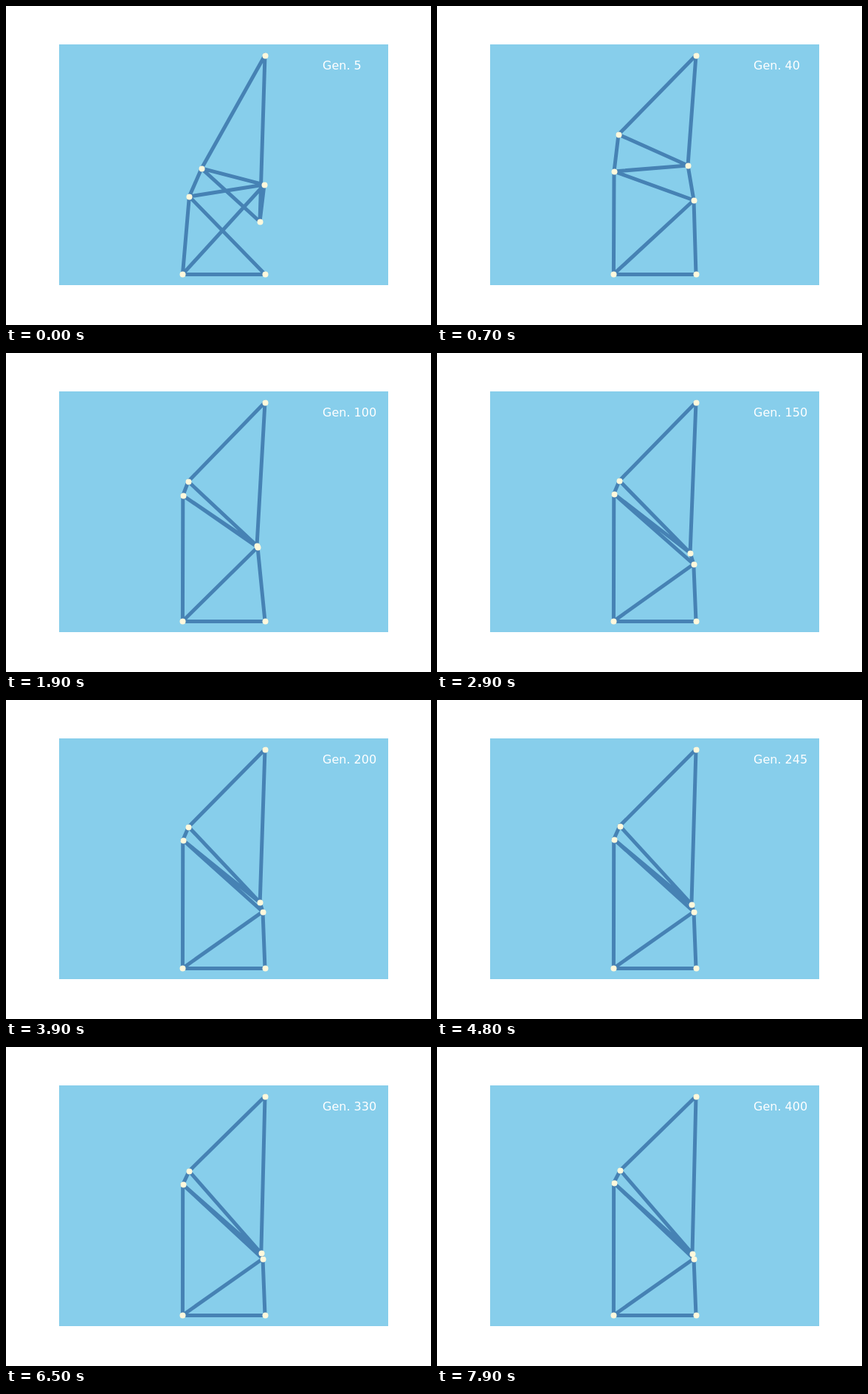
An HTML page for the animation above (8000 ms loop, 576 by 432 pixels).

```html
<!DOCTYPE html>
<html lang="en">
<head>
<meta charset="utf-8">
<title>Truss evolution</title>
<style>
  html, body { margin: 0; width: 100%; height: 100%; overflow: hidden; background: #fff; }
  svg { display: block; width: 576px; height: 432px; }
  text { font: 16px "DejaVu Sans", sans-serif; fill: #fff; }
  path { fill: none; stroke: steelblue; stroke-width: 5; stroke-linecap: square; }
  circle { fill: cornsilk; }
</style>
</head>
<body>
<svg viewBox="0 0 576 432">
  <rect x="72" y="52" width="446" height="326" fill="skyblue"/>
  <path d="M239.5 363.5H351.5"/>
  <path id="bars"/>
  <g id="joints"></g>
  <text id="label" x="429" y="86"></text>
</svg>
<script>
const STEP = 100, LOOP = 8000, GENS_PER_STEP = 5;
const DRIFT_START = 1300, DRIFT_HOLD = 800, DRIFT_STAGES = 8;

// Fixed joints: A, B at the base and T at the tip
const fixed = { A: [239.4, 363.2], B: [351, 363.2], T: [351, 66.7] };

const shared = "AP AQ PQ PL QU LU LT UT";
const crossed = shared + " PB LQ";
const braced = shared + " BQ PU";

// Free joints of the main designs
const wild    = { L: [265, 220], P: [248.4, 258], U: [344, 292], Q: [350, 242] };
const upright = { L: [246, 174], P: [240, 224], U: [340, 216], Q: [348, 263] };
const narrow  = { L: [247, 174], P: [239.8, 193], U: [340, 261], Q: [341, 263] };
const settled = { L: [248.4, 167], P: [239.6, 184], U: [346, 280], Q: [348, 286.7] };

const easeOut = power => p => 1 - (1 - p) ** power;
const smooth = p => p * p * (3 - 2 * p);
const drift = { L: smooth, P: p => p, U: easeOut(2.5), Q: easeOut(12) };

const byId = id => document.getElementById(id);
const bars = byId("bars"), joints = byId("joints"), label = byId("label");

// Improvements arrive in jumps, each held for a while
function refine(time) {
  const stage = Math.floor((time - DRIFT_START) / DRIFT_HOLD);
  const p = Math.max(0, stage / DRIFT_STAGES);
  const pose = {};
  for (const id in drift) {
    const k = drift[id](p);
    pose[id] = narrow[id].map((from, i) => from + (settled[id][i] - from) * k);
  }
  return pose;
}

function poseAt(time) {
  if (time < 300) return wild;
  return time < 900 ? upright : refine(time);
}

function drawTruss(pose, links) {
  const at = { ...fixed, ...pose };
  const snap = v => Math.round(v) + 0.5;
  bars.setAttribute("d", links.split(" ").map(([a, b]) => `M${at[a]}L${at[b]}`).join(""));
  joints.innerHTML = Object.values(at)
    .map(([x, y]) => `<circle cx="${snap(x)}" cy="${snap(y)}" r="4"/>`).join("");
}

let shown = -1;
function render(time) {
  const step = Math.floor((time % LOOP) / STEP);
  if (step === shown) return;
  shown = step;
  const pose = poseAt(step * STEP);
  drawTruss(pose, pose === wild ? crossed : braced);
  label.textContent = `Gen. ${(step + 1) * GENS_PER_STEP}`;
}

const start = performance.now();
function tick() {
  render(performance.now() - start);
  requestAnimationFrame(tick);
}
tick();
</script>
</body>
</html>
```
